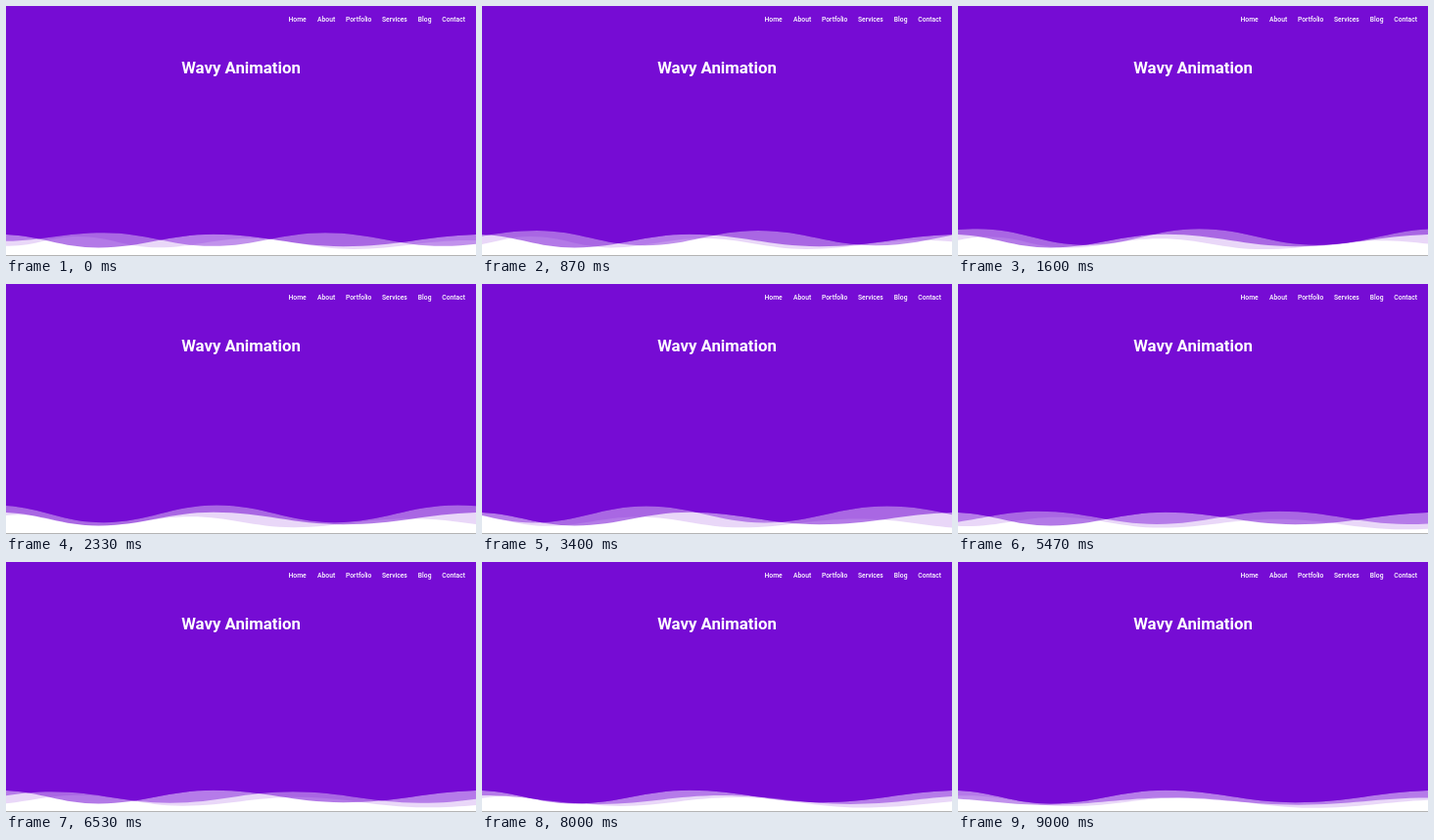
Recreate the animation shown at these times as an HTML page with a canvas. Size 480 by 256 pixels, loop 9.07 s.

```html
<!DOCTYPE html>
<html lang="en">
<head>
<meta charset="utf-8">
<title>Wavy Animation</title>
<style>
html, body { margin: 0; width: 100%; height: 100%; overflow: hidden; background: #fff; }
canvas { display: block; width: 480px; height: 256px; }
</style>
</head>
<body>
<canvas id="stage"></canvas>
<script>
const W = 480, H = 256, LOOP = 9070, STEPS = 136;
const PURPLE = '#760cd4';
const canvas = document.getElementById('stage');
const ctx = canvas.getContext('2d');
const ratio = window.devicePixelRatio || 1;
canvas.width = W * ratio;
canvas.height = H * ratio;

// Fills above a wave whose turning points alternate: even n are crests, odd n troughs.
// Their spacing widens steadily from left to right.
function wavePath({ start, step, growth, crest, trough }) {
  const path = new Path2D();
  const point = n => [start + step * n + growth * n * n, n % 2 ? trough(n) : crest(n)];
  let [x0, y0] = point(-2);
  path.moveTo(x0, 200);
  path.lineTo(x0, y0);
  for (let n = -1; n <= 8; n++) {
    const [x, y] = point(n);
    const bend = (x - x0) * 0.4;
    path.bezierCurveTo(x0 + bend, y0, x - bend, y, x, y);
    [x0, y0] = [x, y];
  }
  path.lineTo(x0, 200);
  path.closePath();
  return path;
}

const stillWave = () => wavePath({
  start: -8, step: 95, growth: 7.5,
  crest: () => 233.8,
  trough: n => 248 - 0.6 * n
});

// Scrolls left while slowing down; rises at first, then sinks.
function driftWave(s) {
  const lift = 2.5 * Math.abs(s - 2.6) - 7;
  return wavePath({
    start: 100 - 52 * s + 1.37 * s * s, step: 108, growth: 2.5,
    crest: () => 232.7 + lift,
    trough: n => Math.min(246, 243.5 + 2.5 * n) + 0.3 * lift
  });
}

const faintWave = s => wavePath({
  start: 73 - 27 * s, step: 76, growth: 6,
  crest: n => 236 + n + 0.13 * s,
  trough: n => 246.5 + 0.8 * n + 0.13 * s
});

function fillWave(path, alpha) {
  ctx.globalAlpha = alpha;
  ctx.fill(path);
  ctx.globalAlpha = 1;
}

function drawText() {
  ctx.fillStyle = '#fff';
  ctx.textAlign = 'left';
  ctx.font = '500 6.75px Roboto, sans-serif';
  const menu = { Home: 288.5, About: 318, Portfolio: 347, Services: 384, Blog: 420.8, Contact: 445.3 };
  for (const label in menu) ctx.fillText(label, menu[label], 16);
  ctx.textAlign = 'center';
  ctx.font = 'bold 16.8px Roboto, sans-serif';
  ctx.fillText('Wavy Animation', 240, 69);
}

function draw(s) {
  ctx.setTransform(ratio, 0, 0, ratio, 0, 0);
  ctx.fillStyle = '#fff';
  ctx.fillRect(0, 0, W, H);

  const still = stillWave();
  const drift = driftWave(s);
  ctx.fillStyle = PURPLE;
  fillWave(faintWave(s), 0.16);
  fillWave(drift, 0.45);
  fillWave(still, 0.55);

  // Where both main waves meet, the colour is solid.
  ctx.save();
  ctx.clip(still);
  ctx.fill(drift);
  ctx.restore();
  ctx.fillRect(0, 0, W, 222);

  ctx.fillStyle = '#b4b4b4';
  ctx.fillRect(0, H - 1, W, 1);
  drawText();
}

function tick() {
  const step = LOOP / STEPS;
  const t = performance.now() % LOOP;
  draw(Math.floor(t / step) * step / 1000);
  requestAnimationFrame(tick);
}
tick();
</script>
</body>
</html>
```
